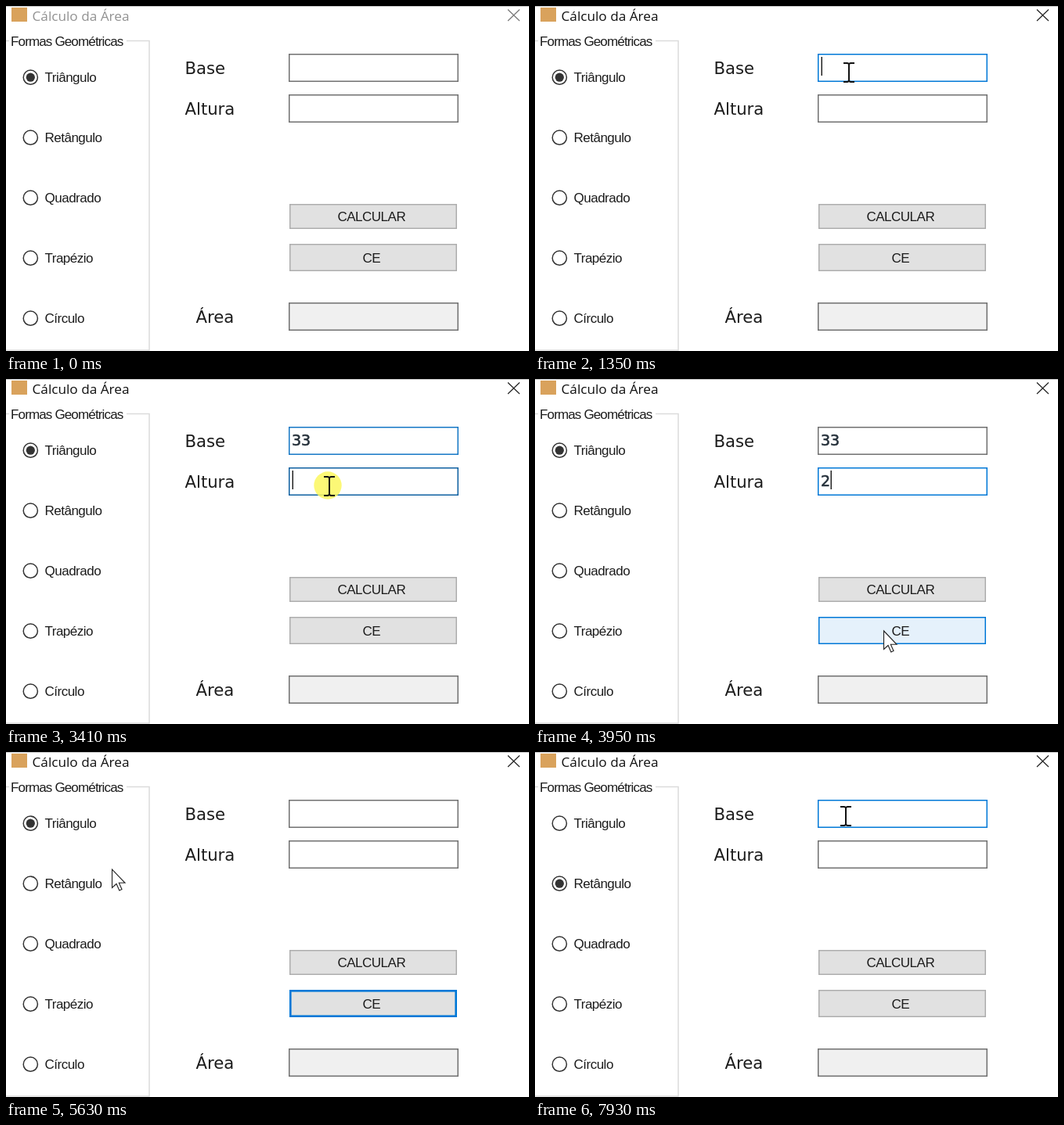
These frames come from a looping animation (668x441 px, 8 s). An HTML page:

```html
<!DOCTYPE html>
<html lang="pt">
<head>
<meta charset="utf-8">
<title>Cálculo da Área</title>
<style>
  html, body { margin: 0; width: 100%; height: 100%; overflow: hidden; background: #fff; }
  svg { display: block; width: 100vw; height: 100vh; }
  text { font: 17px "Liberation Sans", Arial, sans-serif; letter-spacing: -.5px; fill: #1c1c1c; }
  .title { font: 17.2px "Open Sans", sans-serif; letter-spacing: 0; }
  .legend { letter-spacing: -.85px; }
  .label { font: 21.2px "DejaVu Sans", Verdana, sans-serif; letter-spacing: 0; }
  .value { font: 19px "DejaVu Sans", Verdana, sans-serif; letter-spacing: 0;
           fill: #27323c; stroke: #27323c; stroke-width: .6; }
</style>
</head>
<body>
<svg id="stage" viewBox="0 0 668 441">
  <path d="M0 .5H668" stroke="#c4c4c4"/>
  <rect x="7" y="2" width="20" height="18" fill="#d9a25c"/>
  <text class="title" id="title" x="33.5" y="19">Cálculo da Área</text>
  <path id="close" d="M641 4.5L656 19M656 4.5L641 19" stroke-width="1.2"/>
  <path d="M0 44.5H4M154 44.5H183V440H0" fill="none" stroke="#dcdcdc" stroke-width="1.5"/>
  <text class="legend" x="6" y="51">Formas Geométricas</text>
</svg>
<script>
const stage = document.getElementById('stage');
const title = document.getElementById('title');
const closeMark = document.getElementById('close');

const LOOP = 8000, BLINK = 530, CARET_DELAY = 80, FADE_IN = 130, FADE_OUT = 300;
const GREY = [112, 112, 112], DARK = [45, 45, 45], BLUE = [0, 120, 215];

function set(node, attrs) {
  for (const key in attrs) node.setAttribute(key, attrs[key]);
}
function add(tag, attrs, text = '') {
  const node = document.createElementNS('http://www.w3.org/2000/svg', tag);
  set(node, attrs);
  node.textContent = text;
  stage.append(node);
  return node;
}
const show = (node, on) => set(node, { visibility: on ? 'visible' : 'hidden' });
const ramp = (t, from, length) => {
  const p = Math.min(1, Math.max(0, (t - from) / length));
  return p * p * (3 - 2 * p);
};
const mix = (a, b, p) => a.map((v, i) => v + (b[i] - v) * p);

// Keeps the whole outline inside the control's area.
function frame(node, { x, y, w, h }, line) {
  set(node, { x: x + line / 2, y: y + line / 2, width: w - line, height: h - line, 'stroke-width': line });
}

function field(label, labelX, y, fill = '#fff') {
  add('text', { class: 'label', x: labelX, y: y + 26.3 }, label);
  const node = add('rect', { fill });
  const text = add('text', { class: 'value', x: 365, y: y + 23.5 });
  const control = { type: 'field', x: 361, y, w: 217, h: 36, node, text };
  frame(node, control, 1.5);
  return control;
}
function button(label, textX, y, h) {
  const node = add('rect', {});
  add('text', { x: textX, y: y + h / 2 + 6 }, label);
  return { type: 'button', x: 362, y, w: 214, h, node };
}
function radio(label, i) {
  const cy = 91.2 + i * 77;
  const node = add('circle', { cx: 31.3, cy, r: 9.1, 'stroke-width': 1.5 });
  const dot = add('circle', { cx: 31.3, cy, r: 5.6 });
  add('text', { x: 49.5, y: cy + 6.2 }, label);
  return { type: 'radio', x: 22, y: cy - 12, w: 101, h: 24, node, dot };
}
const base = field('Base', 228.5, 61);
const height = field('Altura', 228.5, 113);
const area = field('Área', 242.5, 379, '#f0f0f0');
const calculate = button('CALCULAR', 423.5, 253, 32);
const clear = button('CE', 455.5, 304, 35);
const radios = ['Triângulo', 'Retângulo', 'Quadrado', 'Trapézio', 'Círculo'].map(radio);
const fields = [base, height, area], buttons = [calculate, clear];
const controls = [...fields, ...buttons, ...radios];

const caret = add('rect', { width: 1.5, height: 24, fill: '#222' });
const halo = add('circle', { r: 17.7, fill: '#fcf75e', opacity: .85 });
const arrow = add('path', {
  d: 'M.5 0V23.500L6 18.500L9.800 27L13 25.500L9.300 17.300H17Z',
  fill: '#fff', stroke: '#222', 'stroke-width': 1.1
});
const beam = add('path', {
  d: 'M-7 -12H-2L0 -11L2 -12H7M0 -11V11M-7 12H-2L0 11L2 12H7',
  fill: 'none', stroke: '#111', 'stroke-width': 2
});

// The session: where the pointer rests, when it presses there, and the keys typed.
const stops = [
  { from: 530, to: 530, x: 432, y: 440 },
  { from: 1060, to: 2550, x: 401, y: 85, press: [1220, 1340] },
  { from: 2760, to: 2950, x: 407, y: 112 },
  { from: 3200, to: 3480, x: 413, y: 137, press: [3330, 3480] },
  { from: 3620, to: 3950, x: 445, y: 322 },
  { from: 4150, to: 4780, x: 445, y: 274, press: [4350, 4550] },
  { from: 4960, to: 5300, x: 443, y: 322, press: [5160, 5300] },
  { from: 5630, to: 5760, x: 135, y: 150 },
  { from: 5950, to: 6460, x: 77, y: 172, press: [6020, 6440] },
  { from: 6980, to: 7050, x: 395, y: 85 },
  { from: 7190, to: LOOP, x: 397, y: 82, press: [7260, 7400] }
];
const keys = [{ at: 2290, key: '3' }, { at: 2490, key: '3' }, { at: 3820, key: '2' }];

const hit = ({ x, y }) =>
  controls.find(c => x >= c.x && x < c.x + c.w && y >= c.y && y < c.y + c.h);

const events = [
  ...keys,
  ...stops.filter(s => s.press).flatMap(s => [
    { at: s.press[0], down: hit(s) },
    { at: s.press[1], up: hit(s) }
  ])
].sort((a, b) => a.at - b.at);

// Replays everything that happened up to time t.
function stateAt(t) {
  const s = { values: new Map(fields.map(f => [f, ''])), checked: radios[0], focusAt: 0, caretAt: 0 };
  for (const e of events.filter(e => e.at <= t)) {
    if (e.down) {
      Object.assign(s, { left: s.focus, focus: e.down, pressed: e.down, focusAt: e.at, caretAt: e.at + CARET_DELAY });
    } else if (e.key) {
      s.values.set(s.focus, s.values.get(s.focus) + e.key);
      s.caretAt = e.at;
    } else {
      s.pressed = null;
      if (e.up === calculate) s.values.set(area, String(s.values.get(base) * s.values.get(height) / 2));
      if (e.up === clear) fields.forEach(f => s.values.set(f, ''));
      if (e.up.type === 'radio') s.checked = e.up;
    }
  }
  return s;
}

function pointerAt(t) {
  const i = stops.findLastIndex(s => s.from <= t);
  if (i < 0) return { x: 0, y: 0, visible: false };
  const here = stops[i], next = stops[i + 1] || here;
  const p = ramp(t, here.to, Math.max(1, next.from - here.to));
  // Typing hides the pointer until it moves again.
  const typed = t < here.to && keys.some(k => k.at >= here.from && k.at <= t);
  return { x: here.x + (next.x - here.x) * p, y: here.y + (next.y - here.y) * p, visible: !typed };
}

function draw(t) {
  const s = stateAt(t), pointer = pointerAt(t);
  const hover = pointer.visible ? hit(pointer) : null;

  set(title, { style: `fill:${s.focus ? '#111' : '#929292'}` });
  set(closeMark, { stroke: s.focus ? '#222' : '#777' });

  for (const f of fields) {
    const glow = f === s.focus ? ramp(t, s.focusAt, FADE_IN)
      : f === s.left ? 1 - ramp(t, s.focusAt, FADE_OUT) : 0;
    const color = mix(f === hover ? DARK : GREY, BLUE, glow);
    set(f.node, { stroke: `rgb(${color.map(Math.round)})` });
    f.text.textContent = s.values.get(f);
  }

  for (const b of buttons) {
    const pressed = b === s.pressed, over = b === hover, focused = b === s.focus;
    set(b.node, {
      fill: pressed ? '#cce4f7' : over ? '#e5f1fb' : '#e1e1e1',
      stroke: pressed ? '#005499' : over || focused ? '#0078d7' : '#adadad'
    });
    frame(b.node, b, focused && !over ? 2.6 : 1.5);
  }

  for (const r of radios) {
    const color = r === hover ? '#0078d7' : '#333';
    set(r.node, { stroke: color, fill: r === s.pressed ? '#cce4f7' : '#fff' });
    set(r.dot, { fill: color });
    show(r.dot, r === s.checked);
  }

  const editing = s.focus && s.focus.type === 'field';
  const phase = Math.floor((t - s.caretAt) / BLINK);
  show(caret, editing && phase >= 0 && phase % 2 === 0);
  if (editing) set(caret, { x: 365.5 + s.values.get(s.focus).length * 12, y: s.focus.y + 4 });

  show(halo, s.pressed);
  set(halo, { cx: pointer.x - 2, cy: pointer.y - 1 });

  const overField = hover && hover.type === 'field';
  const place = { transform: `translate(${pointer.x} ${pointer.y})` };
  set(arrow, place);
  set(beam, place);
  show(arrow, pointer.visible && !overField);
  show(beam, pointer.visible && overField);
}

const start = performance.now();
function tick() {
  draw((performance.now() - start) % LOOP);
  requestAnimationFrame(tick);
}
tick();
</script>
</body>
</html>
```
